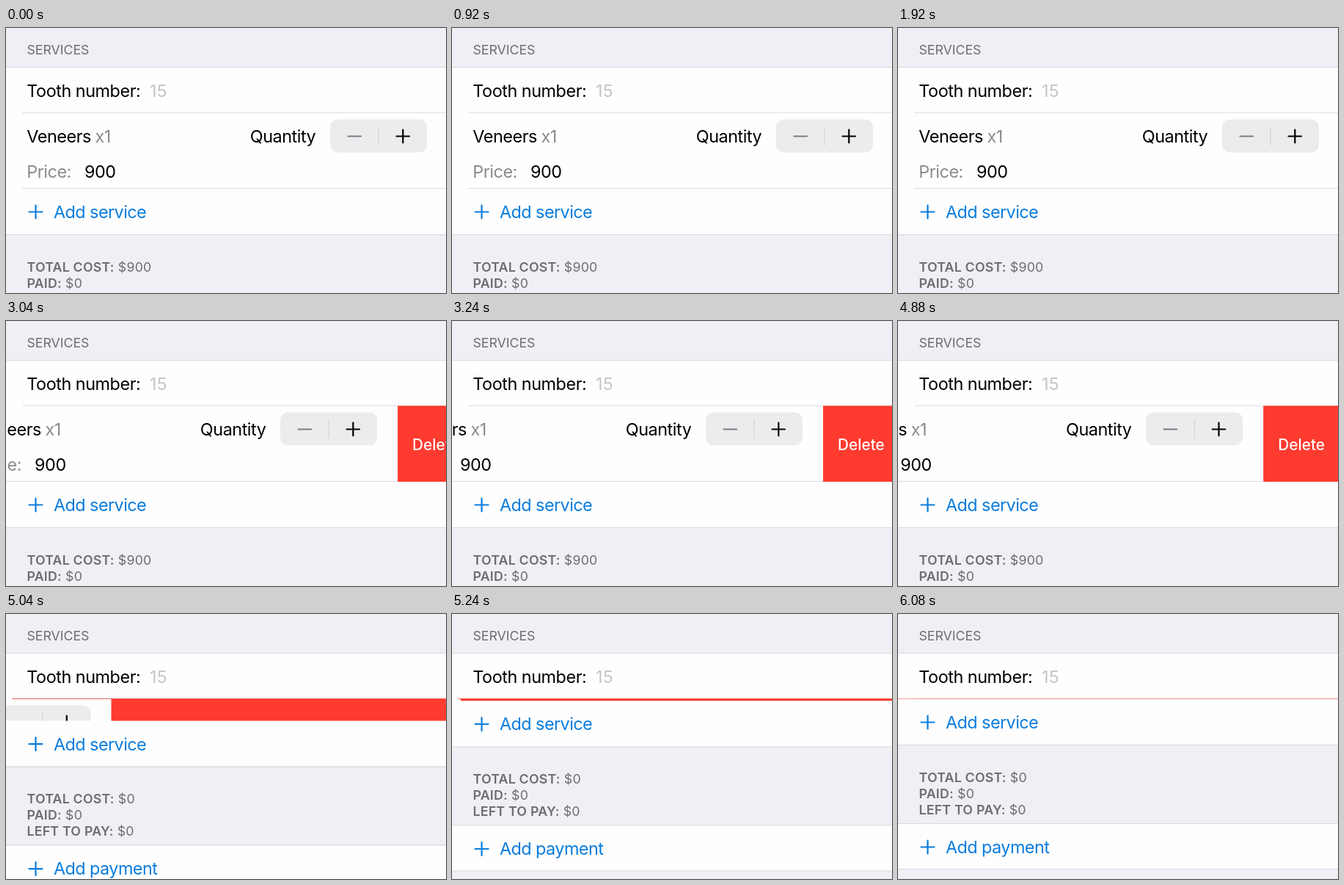
Write an HTML page that moves like this. It is 600 by 361 pixels and loops after 6160 ms.

```html
<!DOCTYPE html>
<html lang="en">
<head>
<meta charset="utf-8">
<title>Swipe to delete</title>
<style>
  html, body { margin: 0; width: 100%; height: 100%; overflow: hidden; background: #f1eff5; }
  svg { display: block; width: 100%; height: 100%; }
  text { font: 400 23.4px Inter, Roboto, sans-serif; letter-spacing: -.02em; white-space: pre; }
  .caption { font-size: 17.8px; letter-spacing: -.003em; fill: #6e6d72; }
  .sum { letter-spacing: .011em; }
  .sum .label { font-weight: 600; }
  .muted { fill: #8b8b8f; }
  .hint { fill: #c5c5c8; letter-spacing: .01em; }
  .link { fill: #0a7cdd; letter-spacing: -.024em; }
  .delete { font-size: 20.8px; font-weight: 500; letter-spacing: 0; fill: #fff; }
  .row { fill: #fefefe; }
  .rule { stroke: #dad8de; stroke-width: 1.2; }
  .inner { stroke: #e0dfe4; }
  .icon { fill: none; stroke-width: 2.2; stroke-linecap: round; }
</style>
</head>
<body>
<svg viewBox="0 0 600 361" preserveAspectRatio="none">
  <defs>
    <clipPath id="rowClip"><rect id="rowBox" y="115" width="600" height="104"/></clipPath>
  </defs>

  <rect width="600" height="361" fill="#f1eff5"/>
  <text class="caption" x="28.5" y="36">SERVICES</text>
  <rect class="row" y="54" width="600" height="165"/>
  <path class="rule" d="M0 53.5H600"/>
  <text x="28.3" y="94">Tooth number:</text>
  <text class="hint" x="196" y="94">15</text>
  <path class="rule inner" d="M22 115.500H600"/>
  <path id="redRule" stroke="#e2685f" stroke-width="1.2" d="M8 115.500H600"/>

  <g clip-path="url(#rowClip)">
    <g id="service">
      <rect class="row" y="116" width="602" height="103"/>
      <text x="28.3" y="156">Veneers</text>
      <text class="muted" x="121.500" y="156">x1</text>
      <text class="muted" x="28.3" y="204">Price:</text>
      <text x="107" y="204">900</text>
      <text x="332.8" y="156">Quantity</text>
      <rect x="442" y="124.5" width="132" height="45" rx="10.5" fill="#ececee"/>
      <path d="M508 134.500V160" stroke="#d3d3d6" stroke-width="1.2"/>
      <path class="icon" stroke="#7c7c80" d="M466.500 147.500H484"/>
      <path class="icon" stroke="#000" d="M532.500 147.500H550M541.300 138.700V156.300"/>
      <rect x="602" y="115.500" width="700" height="103.500" fill="#ff3a2f"/>
      <text class="delete" x="622" y="175.500">Delete</text>
    </g>
  </g>

  <g id="below">
    <rect class="row" y="219" width="600" height="62"/>
    <path class="icon" stroke="#0a7cdd" d="M31.500 250.500H49.500M40.500 241.500V259.500"/>
    <text class="link" x="65" y="259">Add service</text>
    <rect y="281" width="600" height="108" fill="#f1eff5"/>
    <path class="rule" d="M0 281.500H600M0 388.500H600"/>
    <text class="caption sum" x="28.5" y="331.500"><tspan class="label">TOTAL COST:</tspan> <tspan id="total">$900</tspan></text>
    <text class="caption sum" x="28.5" y="353.500"><tspan class="label">PAID:</tspan> $0</text>
    <text class="caption sum" x="28.5" y="375.500"><tspan class="label">LEFT TO PAY:</tspan> $0</text>
    <rect class="row" y="389" width="600" height="62"/>
    <path class="icon" stroke="#0a7cdd" d="M31.500 420.500H49.500M40.500 411.500V429.500"/>
    <text class="link" x="65" y="428.500">Add payment</text>
    <path class="rule" d="M0 450.500H600"/>
  </g>
  <path id="seam" class="rule" d="M22 218.500H600"/>
</svg>
<script>
  const LOOP = 6160, STEP = 40;
  const SWIPE = 2860, REMOVE = 4880;
  const WIDTH = 602, OPEN = 103.8, ROW = 103;
  const $ = id => document.getElementById(id);
  const show = (id, on) => $(id).setAttribute('visibility', on ? 'visible' : 'hidden');
  const move = (id, x, y) => $(id).setAttribute('transform', `translate(${x.toFixed(2)} ${y.toFixed(2)})`);

  const swipe = ms => ms <= 0 ? 0 : 1 - Math.exp(-Math.pow(ms / 171, 1.19));

  // Critically damped spring
  const spring = ms => {
    const k = Math.max(0, ms) * 0.0156;
    return 1 - (1 + k) * Math.exp(-k);
  };

  function draw(t) {
    const opened = OPEN * swipe(t - SWIPE);
    const gone = spring(t - REMOVE);
    const offset = opened + (WIDTH - OPEN) * gone;
    const lift = ROW * gone;

    move('service', -offset, 0);
    move('below', 0, -lift);
    $('rowBox').setAttribute('height', Math.max(0, 104 - lift).toFixed(2));
    $('total').textContent = t > REMOVE ? '$0' : '$900';
    show('redRule', t > REMOVE && t < REMOVE + 480);

    // Bottom separator of the service row, drawn above the row below it
    show('seam', t <= REMOVE);
    $('seam').setAttribute('d', `M${Math.max(0, 22 - offset)} 218.5H${Math.min(600, WIDTH - offset)}`);
  }

  function tick(now) {
    draw(Math.floor((now % LOOP) / STEP) * STEP);
    requestAnimationFrame(tick);
  }
  draw(0);
  requestAnimationFrame(tick);
</script>
</body>
</html>
```
